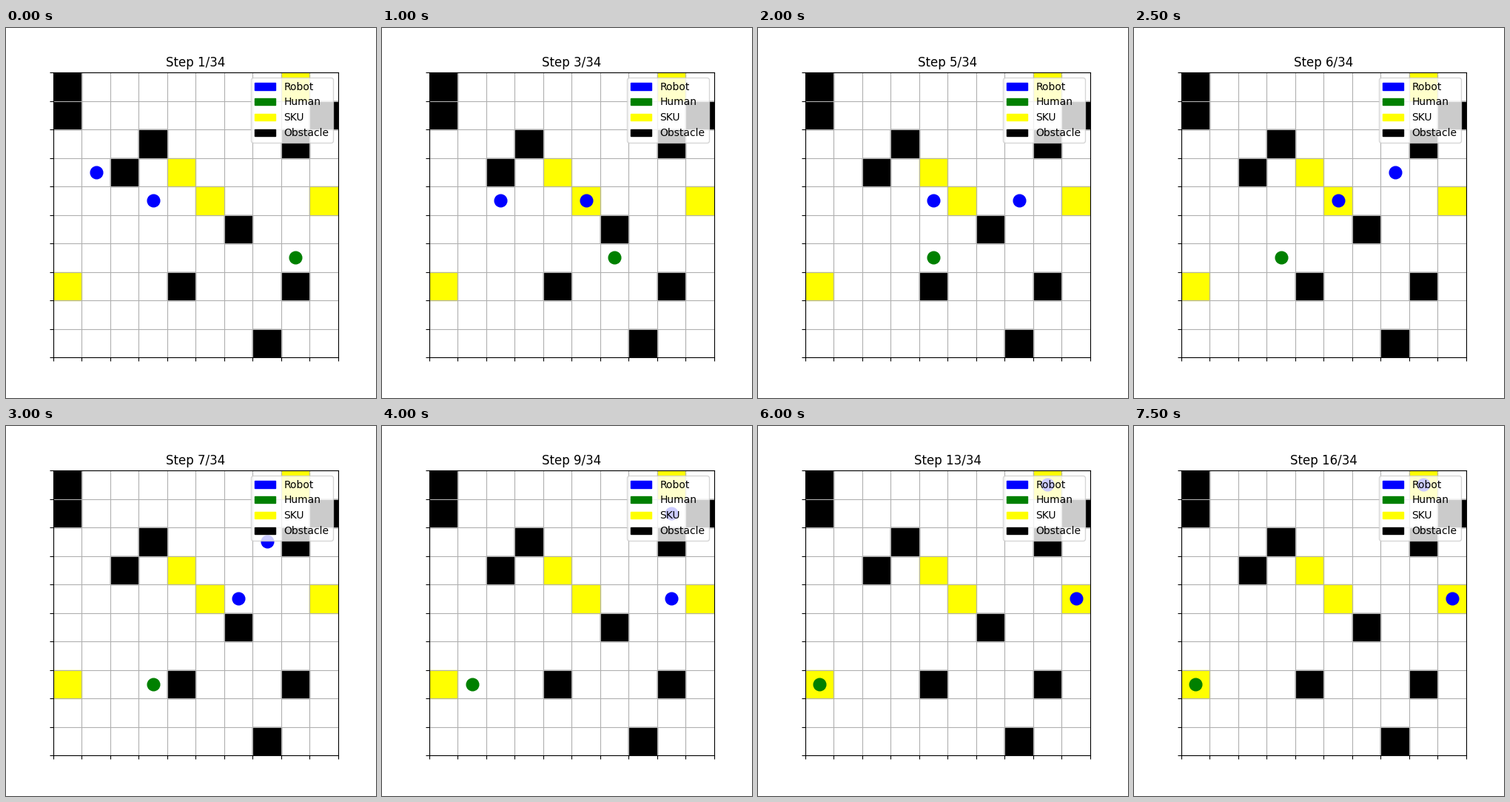
Animation, 500 px wide and 500 px high, one loop 8 s. Source, as a matplotlib script:

```python
import matplotlib.pyplot as plt
from matplotlib.animation import FuncAnimation
from matplotlib.patches import Patch, Rectangle

SIZE = 10
TOTAL_STEPS = 34
SHOWN_STEPS = 16
STEP_MS = 500

# Cells are (column, row), counted from the top left.
OBSTACLES = [(0, 0), (0, 1), (9, 1), (3, 2), (8, 2),
             (2, 3), (6, 5), (4, 7), (8, 7), (7, 9)]
SKUS = [(8, 0), (4, 3), (5, 4), (9, 4), (0, 7)]

MOVES = {"L": (-1, 0), "R": (1, 0), "U": (0, -1), "D": (0, 1)}
AGENTS = [
    ("blue", (1, 3), "DRRRRRRRR"),
    ("blue", (3, 4), "RRRRUUURU"),
    ("green", (8, 6), "LLLLLDLLL"),
]


def position(start, route, step):
    """Cell reached after the given number of moves; agents wait at the end."""
    x, y = start
    for move in route[:step]:
        dx, dy = MOVES[move]
        x, y = x + dx, y + dy
    return x, y


def fill_cells(ax, cells, color):
    for cell in cells:
        ax.add_patch(Rectangle(cell, 1, 1, color=color))


fig, ax = plt.subplots(figsize=(5, 5), dpi=100)
ax.set_xlim(0, SIZE)
ax.set_ylim(SIZE, 0)
ax.set_aspect("equal")
ax.set_xticks(range(SIZE + 1))
ax.set_yticks(range(SIZE + 1))
ax.set_xticklabels([])
ax.set_yticklabels([])
ax.grid(True)

fill_cells(ax, SKUS, "yellow")
fill_cells(ax, OBSTACLES, "black")
markers = [ax.plot([], [], "o", color=color, markersize=12)[0]
           for color, _, _ in AGENTS]
title = ax.set_title("")

legend = [("Robot", "blue"), ("Human", "green"),
          ("SKU", "yellow"), ("Obstacle", "black")]
ax.legend(handles=[Patch(color=c, label=name) for name, c in legend],
          loc="upper right")


def update(step):
    for marker, (_, start, route) in zip(markers, AGENTS):
        x, y = position(start, route, step)
        marker.set_data([x + 0.5], [y + 0.5])
    title.set_text(f"Step {step + 1}/{TOTAL_STEPS}")
    return [*markers, title]


anim = FuncAnimation(fig, update, frames=SHOWN_STEPS, interval=STEP_MS,
                     repeat=True, repeat_delay=0, blit=False)
plt.show()
```
